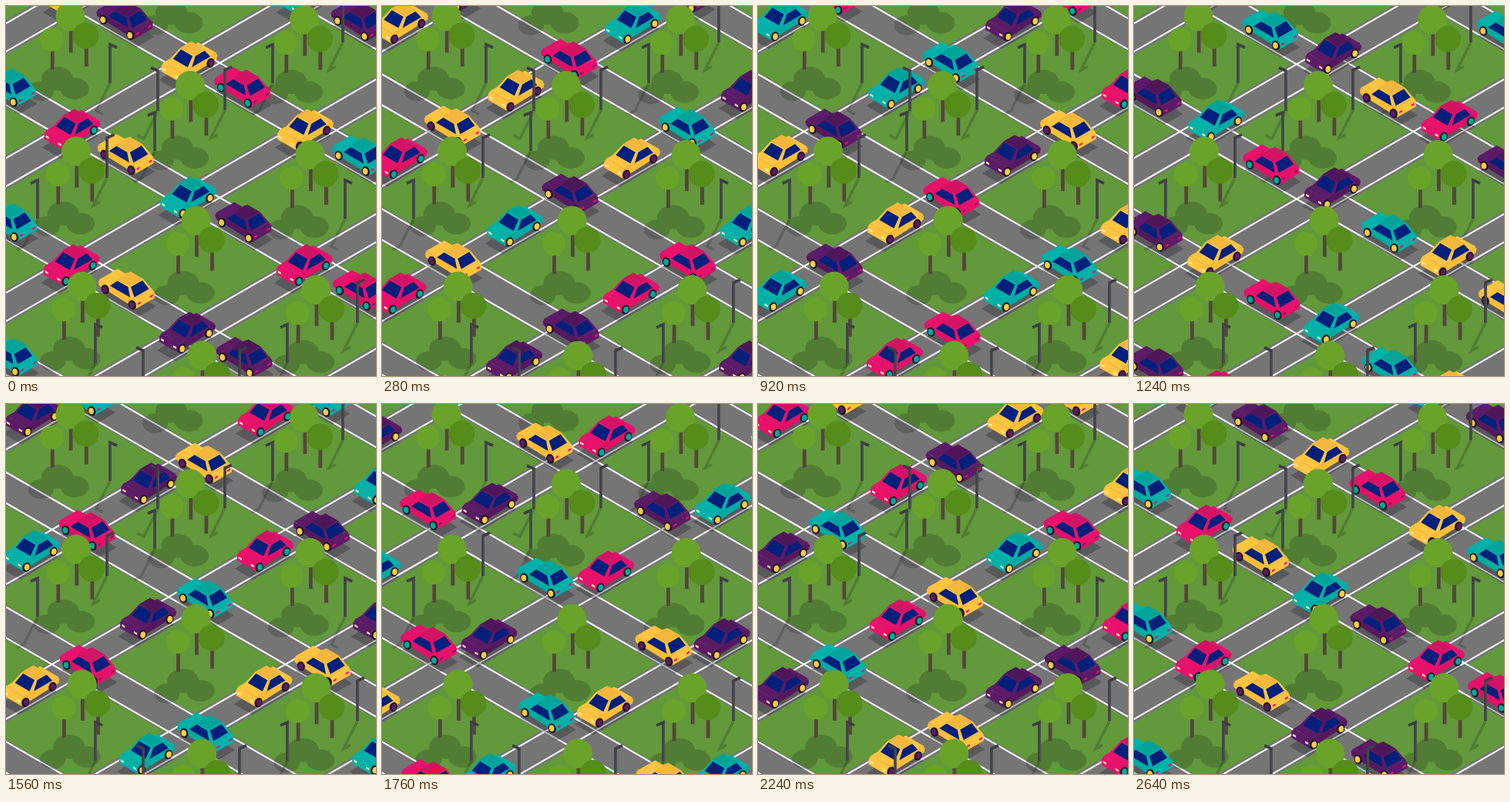
Recreate the animation shown at these times as an HTML page with a canvas. Size 480x480 px, loop 2680 ms.

```html
<!DOCTYPE html>
<html lang="en">
<head>
<meta charset="utf-8">
<style>
  html, body { margin: 0; height: 100%; overflow: hidden; background: #61993b; }
  canvas { display: block; }
</style>
</head>
<body>
<canvas id="stage" width="480" height="480"></canvas>
<script>
const ctx = document.getElementById('stage').getContext('2d');
const LOOP = 2680, SPEED = 0.2279, SLOPE = 0.5774, STEP = 174.8;
const SHADOW = 'rgba(25,35,25,.24)', NAVY = '#00207b';

const PAINT = {
  Y: { body: '#ffc440', side: '#fdbd37', roof: '#f2b73c', hub: '#5c1a63', tail: '#e8116a' },
  K: { body: '#e9116b', side: '#e40f68', roof: '#d31364', hub: '#00a89f', tail: '#7a1a5c' },
  T: { body: '#00b2a9', side: '#00aba2', roof: '#00a49b', hub: '#ffcb45', tail: '#e8116a' },
  P: { body: '#5b1b66', side: '#55185f', roof: '#50165a', hub: '#ffcb45', tail: '#e8116a' }
};

// Colour order along each lane, from the top lane down
const UP_LANES = ['TYPK', 'PKTY', 'YPKT', 'YPKT', 'YPKT'];
const DOWN_LANES = ['TPKY', 'YTPK', 'TYPK', 'PKTY', 'TKPY'];

// Lamps: foot x, foot y, arm x direction, arm y direction
const LAMPS = [
  [437, 47, 1, -1], [135, 100, 1, 1], [346, 100, -1, 1], [197, 136, -1, -1],
  [284, 135, 1, -1], [193, 188, -1, 1], [131, 223, 1, -1], [41, 276, -1, 1],
  [440, 276, 1, 1], [456, 411, 1, -1], [116, 463, 1, 1], [365, 463, -1, 1],
  [178, 499, -1, -1], [303, 499, 1, -1]
];

// Trees of one group: x, crown y, foot y, radius, colour
const GROUP = [
  [0, 0, 47, 19, '#69a329'],
  [-24, 30, 69, 15.5, '#69a329'],
  [20, 25, 65, 17, '#558c1a']
];

const trees = [];
for (let i = -3; i < 5; i++)
  for (let j = -3; j < 5; j++) {
    const x = 239 + 155.6 * i - 148 * j, y = 103.2 + 89.8 * i + 85.4 * j;
    if (x > -60 && x < 540 && y > -130 && y < 510) trees.push([x, y]);
  }

function poly(points, fill) {
  ctx.beginPath();
  points.forEach(p => ctx.lineTo(...p));
  ctx.closePath();
  ctx.fillStyle = fill;
  ctx.fill();
}

function line(points, color, width) {
  ctx.beginPath();
  points.forEach(p => ctx.lineTo(...p));
  ctx.strokeStyle = color;
  ctx.lineWidth = width;
  ctx.stroke();
}

function oval(x, y, rx, ry, fill) {
  ctx.beginPath();
  ctx.ellipse(x, y, rx, ry, 0, 0, 7);
  ctx.fillStyle = fill;
  ctx.fill();
}

function eachRoad(draw) {
  for (let k = -4; k < 5; k++) {
    draw(108.5 + STEP * k, SLOPE, 20);
    draw(215.7 + STEP * k, -SLOPE, 18.3);
  }
}

function drawGround() {
  ctx.fillStyle = '#61993b';
  ctx.fillRect(0, 0, 480, 480);
  const road = (c, slope, color, width) =>
    line([[-20, c - 20 * slope], [500, c + 500 * slope]], color, width);
  eachRoad((c, s) => road(c, s, '#757575', 39));
  eachRoad((c, s, half) => [-half, half].forEach(d => road(c + d, s, '#fff', 2)));
}

function drawShadows() {
  for (const [x, y] of trees) {
    ctx.beginPath();
    for (const [dx, top, foot, r] of GROUP) {
      const h = foot - top, cx = x + dx - 0.36 * h, cy = y + foot + 0.72 * h;
      ctx.moveTo(cx + r, cy);
      ctx.ellipse(cx, cy, r * 1.08, r * 0.82, 0, 0, Math.PI * 2);
    }
    ctx.fillStyle = SHADOW;
    ctx.fill();
  }
  for (const [x, y, ax, ay] of LAMPS)
    line([[x, y], [x - 18, y + 36], [x - 18 + 9 * ax, y + 36 + 4.5 * ay]], SHADOW, 3.5);
}

// Local axes: u runs along the car towards the viewer, w across it, z up
const pt = (u, w, z) => [u + w - 36.5, 3 + SLOPE * (u - w) - z];

function wheel(u, hub) {
  const [x, y] = pt(u, 0, 6);
  ctx.save();
  ctx.translate(x, y);
  ctx.transform(1, 0.2, 0, 1, 0, 0);
  oval(0, 0, 5.1, 6, '#171420');
  oval(-0.6, 0.2, 3.4, 4.2, hub);
  ctx.restore();
}

function drawCar({ x, y, color, facing }) {
  const c = PAINT[color];
  // Cabin: far and near ends at the belt, then at the roof
  const [b0, b1, r0, r1] = facing ? [5, 37, 13, 27] : [11, 45, 21, 37];
  const L = 49, W = 24, belt = 14, top = 24;
  const light = facing ? '#fff0b0' : c.tail;

  ctx.save();
  ctx.translate(x, y);
  const dx = facing ? -3 : 2;
  poly([pt(0, 0, -2), pt(L, 0, -3), pt(L, W, -3), pt(0, W, 0)]
    .map(([px, py]) => [(facing ? -px : px) + dx, py + 4]), 'rgba(25,25,30,.3)');
  if (facing) ctx.scale(-1, 1);

  poly([pt(0, 1, 5), pt(0, 0, 11), pt(2, 0, belt), pt(L - 3, 0, belt),
    pt(L, 0, 11), pt(L, 0, 4)], c.side);
  poly([pt(L, 0, 4), pt(L, 0, 11), pt(L - 3, 0, belt), pt(L - 3, W, belt),
    pt(L, W, 11), pt(L, W, 4)], c.body);
  poly([pt(1, 0, belt), pt(L - 3, 0, belt), pt(L - 3, W, belt), pt(1, W, belt)], c.body);

  poly([pt(b0, 0, belt), pt(r0, 3, top), pt(r1, 3, top), pt(b1, 0, belt)], c.body);
  poly([pt(b1, 0, belt), pt(r1, 3, top), pt(r1, W - 3, top), pt(b1, W, belt)], c.body);
  poly([pt(b0, 0, belt), pt(r0, 3, top), pt(r0, W - 3, top), pt(b0, W, belt)], c.body);
  poly([pt(r0, 3, top), pt(r1, 3, top), pt(r1, W - 3, top), pt(r0, W - 3, top)], c.roof);

  poly([pt(b0 + 4, 0.3, belt), pt(r0 + 1, 2.7, top - 1),
    pt(r1 - 1, 2.7, top - 1), pt(b1 - 4, 0.3, belt)], NAVY);
  poly([pt(b1 - 0.7, 2.5, belt + 0.5), pt(r1 + 0.8, 4.5, top - 1),
    pt(r1 + 0.8, W - 4.5, top - 1), pt(b1 - 0.7, W - 2.5, belt + 0.5)], NAVY);

  for (const w of [2, W - 6])
    poly([pt(L, w, 7.5), pt(L, w, 10), pt(L, w + 4, 10), pt(L, w + 4, 7.5)], light);
  wheel(9, c.hub);
  wheel(44, c.hub);
  ctx.restore();
}

function carsAt(t) {
  const cars = [];
  const add = (facing, lanes, place) => lanes.forEach((colors, lane) => {
    for (let j = -2; j < 9; j++) {
      const [x, y] = place(lane - 2, j);
      if (x > -50 && x < 530 && y > -45 && y < 525)
        cars.push({ x, y, color: colors[(j + 4) % 4], facing });
    }
  });
  add(false, UP_LANES, (k, j) => {
    const x = 155 + 1.2 * k + 152.7 * j - SPEED * t;
    return [x, 101 + 174.2 * k + SLOPE * x];
  });
  add(true, DOWN_LANES, (k, j) => {
    const x = 236.7 - 1.2 * k + 151.7 * j - SPEED * t;
    return [x, 383.6 + 174.7 * k - SLOPE * x];
  });
  return cars.sort((a, b) => a.y - b.y);
}

function drawTrees() {
  for (const [x, y] of trees) {
    for (const [dx, top, foot] of GROUP)
      line([[x + dx + 0.8, y + top], [x + dx + 0.8, y + foot]], '#56453a', 4.8);
    for (const [dx, top, , r, color] of GROUP)
      oval(x + dx, y + top, r, r, color);
  }
}

function drawLamps() {
  for (const [x, y, ax, ay] of LAMPS) {
    const head = y - 51 + (ay < 0 ? -1 : 1);
    line([[x, y], [x, head], [x + 9 * ax, head + 4 * ay]], '#3f3e44', 3.6);
    line([[x + 1, y], [x + 1, head + 2]], '#55545a', 1);
  }
}

function frame(now) {
  const t = Math.floor((now % LOOP) / 40) * 40;
  drawGround();
  drawShadows();
  carsAt(t).forEach(drawCar);
  drawTrees();
  drawLamps();
  requestAnimationFrame(frame);
}
requestAnimationFrame(frame);
</script>
</body>
</html>
```
